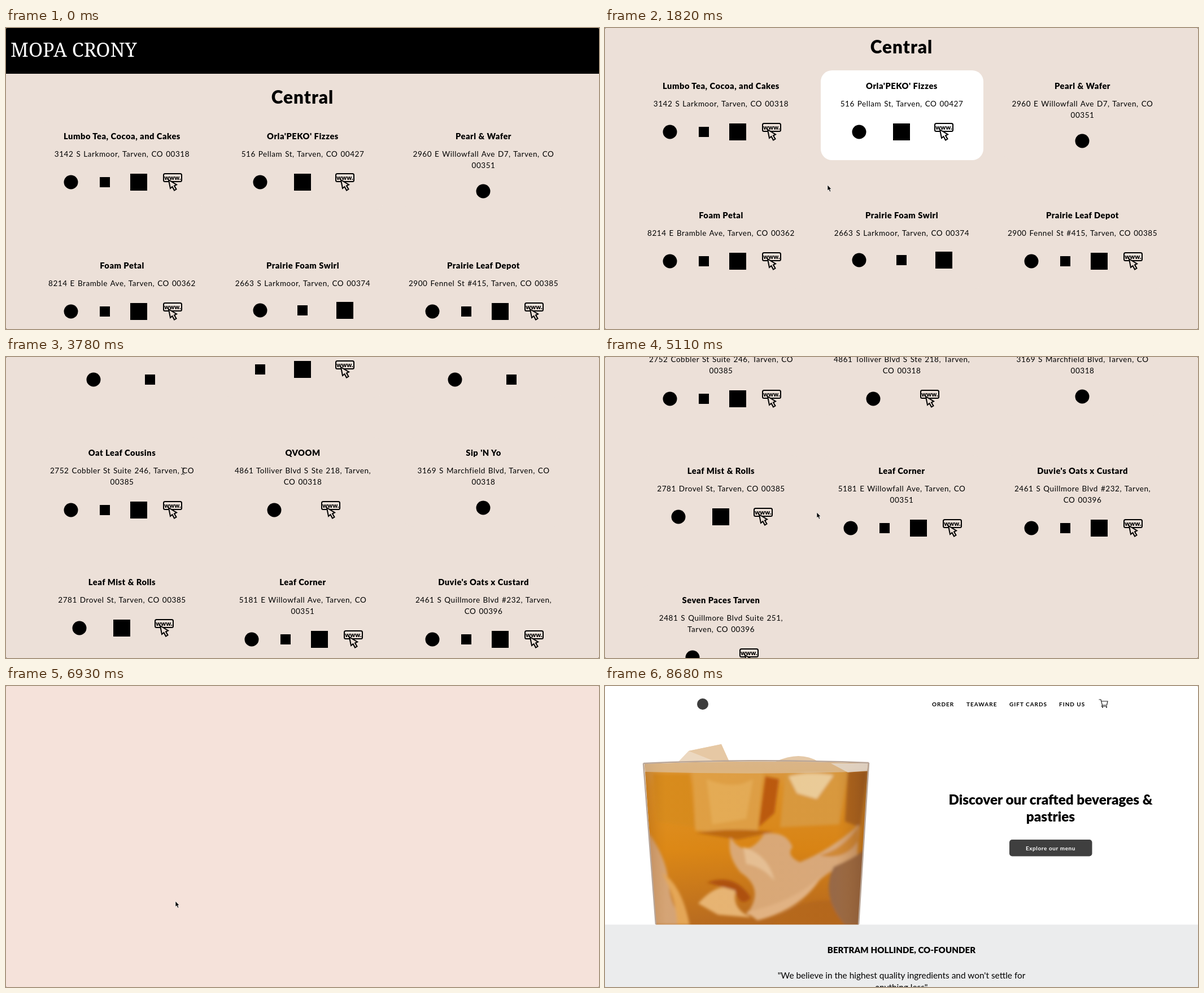
An HTML page that plays this animation: 1050 by 533 pixels, repeating every 8.96 s.

```html
<!DOCTYPE html>
<html lang="en">
<head>
<meta charset="utf-8">
<title>Tea shop finder</title>
<style>
html, body { margin: 0; width: 100%; height: 100%; overflow: hidden; background: #555; }
#stage { position: relative; width: 1050px; height: 533px; overflow: hidden; border-radius: 2px; background: #ece0d8; font-family: Lato, sans-serif; color: #000; }
#stage div, #stage svg, #stage i { position: absolute; }
.full { left: 0; top: 0; width: 1050px; height: 533px; }
.mid { text-align: center; white-space: pre; }
header { position: absolute; width: 1050px; height: 81px; background: #000; color: #fff; font: 500 34px/77px "Noto Serif", serif; text-indent: 8px; }
h1 { position: absolute; margin: 0; top: 102px; width: 1050px; text-align: center; font: 900 31.5px/40px Lato, sans-serif; letter-spacing: 1px; }
.card { width: 288px; height: 159px; border-radius: 20px; background: var(--b); }
.name { top: 17px; width: 288px; font: 900 14.7px/20px Lato, sans-serif; letter-spacing: .5px; }
.addr { top: 49px; width: 288px; font-size: 13.5px; line-height: 20px; letter-spacing: .55px; word-spacing: 1px; }
.card i, .card svg { transform: translate(-50%, -50%); }
.card i { background: #000; }
.y { width: 25px; height: 25px; border-radius: 50%; }
.f { width: 18px; height: 18px; }
.i { width: 30px; height: 30px; }
.nav { top: 22px; font: 700 10px/20px Lato, sans-serif; letter-spacing: 1px; white-space: pre; }
#splash { background: #f5e2da; }
#shop { background: #fff; }
</style>
</head>
<body>
<div id="stage">
  <div id="list"><header>MOPA CRONY</header><h1>Central</h1></div>
  <div id="splash" class="full"></div>
  <div id="shop" class="full">
    <svg class="full" viewBox="0 0 1050 533">
      <defs>
        <linearGradient id="tea" x2="0" y2="1">
          <stop stop-color="#d8a05c"/><stop offset=".18" stop-color="#dc9028"/>
          <stop offset=".55" stop-color="#d98414"/><stop offset="1" stop-color="#b06420"/>
        </linearGradient>
        <linearGradient id="side">
          <stop stop-color="#7a3c10" stop-opacity=".4"/><stop offset=".12" stop-color="#f0a020" stop-opacity=".15"/>
          <stop offset=".85" stop-color="#c87818" stop-opacity=".05"/><stop offset="1" stop-color="#6a3a1c" stop-opacity=".5"/>
        </linearGradient>
        <filter id="soft"><feGaussianBlur stdDeviation="2.500"/></filter>
        <clipPath id="glass"><path d="M70 138Q267 130 466 137L449 423H90Z"/></clipPath>
      </defs>
      <path d="M130 134L148 115 206 103 220 134Z" fill="#ecd8c0"/>
      <path d="M206 103L220 134 196 134 148 115Z" fill="#e6c8a4"/>
      <path d="M302 134Q345 114 378 134Z" fill="#e5c9a8"/>
      <g clip-path="url(#glass)">
        <path d="M60 125H470V423H60Z" fill="url(#tea)"/>
        <g filter="url(#soft)">
          <path d="M85 155H150L160 250 92 240Z" fill="#d4881c"/>
          <path d="M155 150H280L270 262 160 256Z" fill="#dea04a"/>
          <path d="M180 165Q230 185 262 165L250 235 190 245Z" fill="#e4ae5c"/>
          <path d="M284 160L308 165 300 225 272 250Z" fill="#b85410"/>
          <path d="M320 148H430L415 245 310 250Z" fill="#d99a40"/>
          <path d="M325 160Q360 150 405 158L375 200 340 190Z" fill="#ecd0a0"/>
          <path d="M430 150H465L452 250 425 240Z" fill="#a8601c"/>
          <path d="M160 260Q220 250 300 258L235 272Z" fill="#b8640e"/>
          <path d="M70 250Q108 300 112 345T142 423H70Z" fill="#d0a585"/>
          <path d="M100 330Q135 350 150 423H128Q125 370 100 330Z" fill="#e3a860"/>
          <path d="M222 268Q250 310 282 262Q320 255 332 285Q320 300 345 312Q400 290 450 245L447 300Q390 330 350 370T250 405Q285 360 240 330Q215 300 222 268Z" fill="#d9ab80"/>
          <path d="M245 285Q290 300 300 345Q280 320 250 315Z" fill="#e6c4a0"/>
          <path d="M380 300Q420 290 448 250V275Q425 310 380 300Z" fill="#d08a38"/>
          <path d="M165 385Q200 345 232 360Q222 395 260 410L200 405Z" fill="#e7b87e"/>
          <path d="M180 348Q230 330 258 375Q240 395 230 362Z" fill="#a84a0c"/>
          <path d="M300 423Q340 365 440 385V423Z" fill="#b3661c"/>
          <path d="M405 320Q440 305 460 290V423H425Q380 370 405 320Z" fill="#956848"/>
          <path d="M250 400Q330 385 385 335Q350 395 270 415Z" fill="#e2b68c"/>
        </g>
        <path d="M60 125H470V423H60Z" fill="url(#side)"/>
        <path d="M70 138Q267 130 466 137L465 151Q267 158 71 152Z" fill="#ddc7ae" opacity=".6"/>
        <path d="M400 137H466L464 150 430 153Z" fill="#e6e0da" opacity=".7"/>
      </g>
      <path d="M68 137Q267 128 467 136M68 137L90 422M467 136L449 422" fill="none" stroke="#b9a698" stroke-width="2.500"/>
      <path d="M0 422.500H1050V533H0Z" fill="#ebeced"/>
      <circle cx="173" cy="32" r="10" fill="#3d3d3d"/>
      <path d="M874.500 24H878L880.500 34H888.500L890 27H879M880.500 34L879.500 36H889" fill="none" stroke="#222" stroke-width="1.200"/>
      <circle cx="881" cy="37.500" r="1.100"/><circle cx="888" cy="37.500" r="1.100"/>
      <rect x="716" y="272" width="146.500" height="29.500" rx="5" fill="#3f3f3f"/>
    </svg>
    <div class="nav" style="left:579px">ORDER</div>
    <div class="nav" style="left:640px">TEAWARE</div>
    <div class="nav" style="left:716px">GIFT CARDS</div>
    <div class="nav" style="left:804px">FIND US</div>
    <div class="mid" style="left:564px;width:450px;top:186px;font-weight:900;font-size:24.3px;line-height:30px">Discover our crafted beverages &amp;
pastries</div>
    <div class="mid" style="left:716px;width:146px;top:277px;color:#fff;font-weight:700;font-size:10px;line-height:20px;letter-spacing:.6px">Explore our menu</div>
    <div class="mid" style="left:0;width:1050px;top:457px;font-weight:900;font-size:15px;line-height:20px;letter-spacing:.1px">BERTRAM HOLLINDE, CO-FOUNDER</div>
    <div class="mid" style="left:0;width:1050px;top:502px;font-size:15.4px;line-height:21px">"We believe in the highest quality ingredients and won't settle for
anything less"</div>
  </div>
  <svg id="mouse" width="60" height="60" viewBox="-30 -30 60 60">
    <circle id="ring" fill="none" stroke="#777" stroke-width="1.500"/>
    <path id="arrow" d="M0 0V10L2.200 8 4 12 5.800 11.200 4.200 7.500H7Z" stroke="#fff" stroke-width=".7"/>
    <path id="beam" d="M2 0Q5 0 5 2Q5 0 8 0M5 2V10M2 12Q5 12 5 10Q5 12 8 12" fill="none" stroke="#222"/>
  </svg>
</div>
<script>
const $ = id => document.getElementById(id);

// name, address (| breaks the line), icons: y f i = links, w = website
const shops = [
  ["Lumbo Tea, Cocoa, and Cakes", "3142 S Larkmoor, Tarven, CO 00318", "yfiw"],
  ["Orla'PEKO' Fizzes", "516 Pellam St, Tarven, CO 00427", "yiw"],
  ["Pearl & Wafer", "2960 E Willowfall Ave D7, Tarven, CO|00351", "y"],
  ["Foam Petal", "8214 E Bramble Ave, Tarven, CO 00362", "yfiw"],
  ["Prairie Foam Swirl", "2663 S Larkmoor, Tarven, CO 00374", "yfi"],
  ["Prairie Leaf Depot", "2900 Fennel St #415, Tarven, CO 00385", "yfiw"],
  ["Wexlou Tarven", "2788 S Quillmore Blvd Unit K, Tarven,|CO 00396", "yf"],
  ["Hush Cup", "4931 E Bramble Ave, Tarven, CO 00362", "fiw"],
  ["Nubbloop", "2678 S Quillmore Blvd, Elmvarn, CO|00351", "yf"],
  ["Oat Leaf Cousins", "2752 Cobbler St Suite 246, Tarven, CO|00385", "yfiw"],
  ["QVOOM", "4861 Tolliver Blvd S Ste 218, Tarven,|CO 00318", "yw"],
  ["Sip 'N Yo", "3169 S Marchfield Blvd, Tarven, CO|00318", "y"],
  ["Leaf Mist & Rolls", "2781 Drovel St, Tarven, CO 00385", "yiw"],
  ["Leaf Corner", "5181 E Willowfall Ave, Tarven, CO|00351", "yfiw"],
  ["Duvie's Oats x Custard", "2461 S Quillmore Blvd #232, Tarven,|CO 00396", "yfiw"],
  ["Seven Paces Tarven", "2481 S Quillmore Blvd Suite 251,|Tarven, CO 00396", "yw"]
];

const www = at => `<svg ${at} width="34" height="32" viewBox="0 0 34 32" stroke="#000" stroke-width="2">
  <rect x="1" y="1" width="32" height="14" rx="2.500" fill="none"/>
  <text x="17" y="11.500" text-anchor="middle" font-family="Lato, sans-serif" font-weight="900" font-size="11" stroke="none">www.</text>
  <path d="M10 12L13 27 16.500 24 20 30.500 23.500 28.500 20 22.500 24 20.500Z" fill="var(--b)"/></svg>`;

const cards = shops.map(([name, addr, icons], k) => {
  const card = document.createElement("div"), n = icons.length;
  card.className = "card";
  card.style.left = 61.5 + k % 3 * 320 + "px";
  card.style.top = 164 + Math.floor(k / 3) * 229 + "px";
  const y = (icons.includes("w") ? 109 : n > 1 ? 107 : 105) + (addr.includes("|") ? 20 : 0);
  card.innerHTML = `<div class="name mid">${name.replace("&", "&amp;")}</div>
    <div class="addr mid">${addr.replace("|", "\n")}</div>` +
    [...icons].map((c, i) => {
      const x = 143.5 + (i - (n - 1) / 2) * 300 / (n + 1);
      const at = `style="left:${x}px;top:${y}px"`;
      return c === "w" ? www(at) : `<i class="${c}" ${at}></i>`;
    }).join("");
  $("list").append(card);
  return card;
});

const clamp = v => Math.min(1, Math.max(0, v));

// keys are [time, value]; linear between them
function track(keys, t) {
  let [t0, v0] = keys[0];
  for (const [t1, v1] of keys) {
    if (t < t1) return v0 + (v1 - v0) * clamp((t - t0) / (t1 - t0));
    [t0, v0] = [t1, v1];
  }
  return v0;
}

const scroll = [[910, 0], [1400, 22], [1470, 22], [1820, 89], [1960, 89], [2240, 175], [2380, 175],
  [2590, 578], [2800, 655], [3290, 709], [4550, 709], [5110, 906], [5600, 1047]];
const mouseX = [[70, 17], [350, 394], [1960, 394], [2590, 270], [3290, 270], [3780, 308], [4480, 330], [5110, 375], [5810, 300]];
const mouseY = [[70, 34], [350, 278], [1960, 278], [2590, 300], [3290, 300], [3780, 196], [4480, 230], [5110, 275], [5810, 381]];
const hover = {
  1: [[350, 0], [630, 1], [1960, 1], [2240, 0]],
  9: [[3780, 0], [4200, 1], [4480, 1], [4760, 0]],
  15: [[5880, 0], [6300, 1]]
};
const show = (el, on) => { el.style.visibility = on ? "visible" : "hidden"; };

function render(t) {
  $("list").style.transform = `translateY(${-Math.round(track(scroll, t))}px)`;
  cards.forEach((card, k) => {
    const h = hover[k] ? track(hover[k], t) : 0;
    card.style.setProperty("--b", `rgb(${[236, 224, 216].map(c => Math.round(c + (255 - c) * h))})`);
  });

  show($("splash"), t >= 6580);
  $("shop").style.opacity = 1 - (1 - clamp((t - 7140) / 1260)) ** 3;

  const inside = t >= 70 && t < 7210, text = t >= 3640 && t < 3990;
  const click = t === 770 ? 16.5 : t >= 6440 && t < 6580 ? 23 : 0;
  $("mouse").style.transform = `translate(${track(mouseX, t) - 30}px, ${track(mouseY, t) - 30}px)`;
  show($("arrow"), inside && !text);
  show($("beam"), text);
  show($("ring"), click > 0);
  $("ring").setAttribute("r", click);
}

const start = performance.now();
function tick() {
  const t = (performance.now() - start) % 8960;
  render(Math.floor(t / 70) * 70);
  requestAnimationFrame(tick);
}
tick();
</script>
</body>
</html>
```
